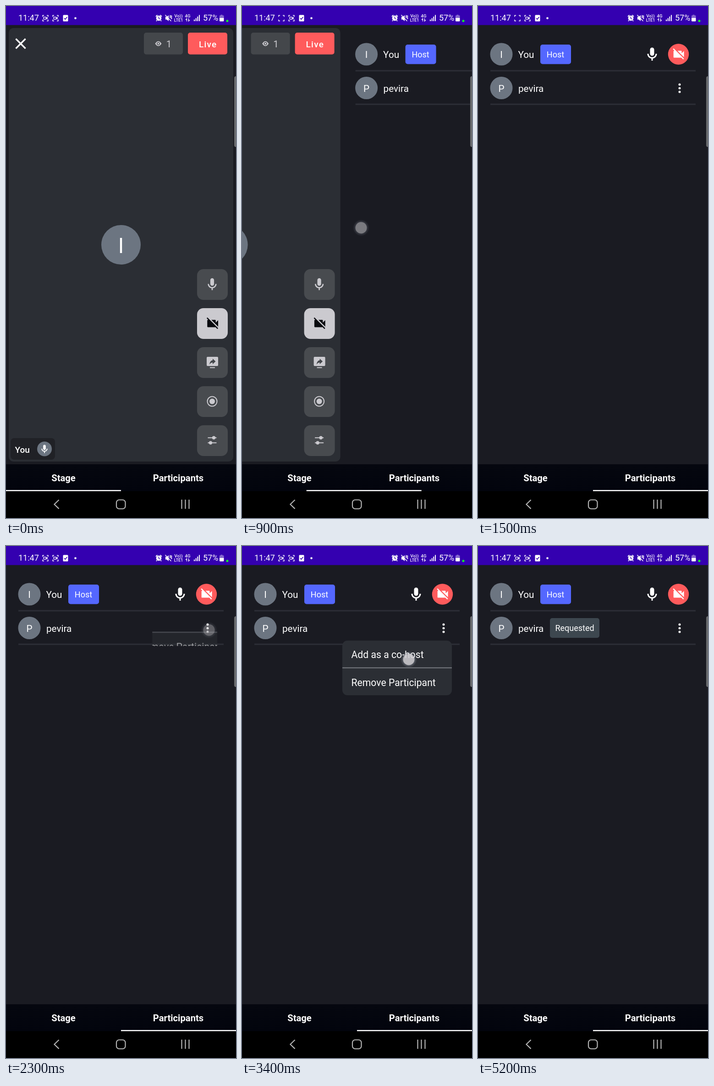
Write an HTML page that moves like this. It is 502 px wide and 1115 px high and loops after 5600 ms.

```html
<!DOCTYPE html>
<html lang="en">
<head>
<meta charset="utf-8">
<title>Live stage</title>
<style>
  html, body { margin: 0; width: 100%; height: 100%; overflow: hidden; background: #1a1b22; }
  svg { display: block; width: 100vw; height: 100vh; font: 20.7px Roboto, sans-serif; fill: #fff; }
  .mid { text-anchor: middle; }
  .bold { font-size: 20.2px; font-weight: 700; }
  .badge { font-size: 18px; }
  .line { fill: none; stroke: #fff; }
  .avatar { fill: #6c7581; }
  .card { fill: #2b2e34; }
  .button { fill: #484b4f; }
  .red { fill: #ff5b5c; }
  .soft { fill: #cbcacf; }
</style>
</head>
<body>
<svg viewBox="0 0 502 1115">
  <defs>
    <path id="mic" d="M0 2c1.66 0 3-1.34 3-3v-6c0-1.66-1.34-3-3-3s-3 1.34-3 3v6c0 1.66 1.34 3 3 3zm5-3c0 2.76-2.24 5-5 5s-5-2.24-5-5h-2c0 3.53 2.61 6.43 6 6.92V9h2V5.92c3.39-.49 6-3.39 6-6.92z"/>
    <path id="camOff" d="M9.5-5.5l-4 4V-5c0-.55-.45-1-1-1h-6.18L9.5 5.18zM-8.23-10L-9.5-8.73-6.77-6H-7.5c-.55 0-1 .45-1 1V5c0 .55.45 1 1 1h12c.21 0 .39-.08.54-.18L8.23 9 9.5 7.73z"/>
    <path id="corners" class="line" stroke-width="1.4" d="M-6-3v-3h3M3-6h3v3M6 3v3h-3M-3 6h-3v-3"/>
    <path id="camera" class="line" stroke-width="1.3" d="M-3.7-2.3h5v4.6h-5zM1.5-.3l2.5-1.6v3.8l-2.5-1.6"/>
    <linearGradient id="tabs" x2="0" y2="1"><stop stop-color="#05070f"/><stop offset="1" stop-color="#02040d"/></linearGradient>
    <radialGradient id="glow"><stop offset=".65" stop-color="#a9b0bd" stop-opacity=".45"/><stop offset="1" stop-color="#a9b0bd" stop-opacity="0"/></radialGradient>
    <clipPath id="reveal"><rect id="revealBox"/></clipPath>
  </defs>

  <rect width="502" height="1115" fill="#1a1b22"/>

  <g id="stagePage">
    <rect class="card" x="6" y="48" width="490" height="944" rx="10"/>
    <path class="line" stroke-width="3.4" d="M21.5 71.5l21 21M42.5 71.5l-21 21"/>
    <rect x="301" y="58" width="85" height="47.500" rx="5" fill="#44474b"/>
    <path class="soft" fill-rule="evenodd" d="M325.500 82q7-10.500 14 0q-7 10.500-14 0zM332.500 78.500a3.500 3.500 0 1 0 .01 0zM332.500 80a2 2 0 1 1-.01 0z"/>
    <text class="mid soft" x="355.500" y="90">1</text>
    <rect class="red" x="397" y="58" width="86" height="47.500" rx="5"/>
    <text x="421" y="90" font-size="19" font-weight="500" letter-spacing="1.200">Live</text>

    <circle class="avatar" cx="251" cy="520" r="43"/>
    <text class="mid" x="251" y="538" font-size="46">I</text>

    <g class="button">
      <rect x="417" y="573" width="67" height="67" rx="14"/>
      <rect class="soft" x="417" y="658" width="67" height="67" rx="14"/>
      <rect x="417" y="743" width="67" height="67" rx="14"/>
      <rect x="417" y="828" width="67" height="67" rx="14"/>
      <rect x="417" y="913" width="67" height="67" rx="14"/>
    </g>
    <g class="soft">
      <use href="#mic" transform="translate(450 606.500) scale(1.370)"/>
      <use href="#camOff" transform="translate(450.500 691.500) scale(1.320)" fill="#08090e"/>
      <path d="M440 764h21q2 0 2 2v16q0 2-2 2h-21q-2 0-2-2v-16q0-2 2-2zM445 786.500h11v2h-11z"/>
      <path fill="#44474b" d="M444 781q1-9 7-9.500v-3.500l6.500 6-6.500 6v-3.500q-4.500 0-7 4.500z"/>
      <circle cx="450" cy="861" r="10.500" fill="none" stroke="#cbcacf" stroke-width="2"/>
      <circle cx="450" cy="861" r="6"/>
      <path d="M440.500 939.200h19v2h-19zM440.500 950.200h19v2h-19z"/>
      <circle cx="453.500" cy="940.200" r="3.700"/><circle cx="446.500" cy="951.200" r="3.700"/>
    </g>

    <rect x="10" y="941" width="97" height="47" rx="8" fill="#202126"/>
    <text x="19.500" y="972.500" font-size="19" font-weight="500">You</text>
    <circle class="avatar" cx="84" cy="964.500" r="16"/>
    <use href="#mic" transform="translate(84 965) scale(.95)"/>
  </g>

  <g id="peoplePage">
    <path fill="#2c2e36" d="M27 139.500h448v3H27zM27 212.500h448v3H27z"/>
    <circle class="avatar" cx="51" cy="105" r="24.500"/>
    <text class="mid" x="51" y="113">I</text>
    <text x="87.500" y="113">You</text>
    <rect x="136" y="84" width="67" height="42.500" rx="5" fill="#5467ff"/>
    <text class="mid badge" x="169" y="111.500">Host</text>
    <use href="#mic" transform="translate(380 105.500) scale(1.500)"/>
    <circle class="red" cx="437.500" cy="105" r="22.700"/>
    <use href="#camOff" transform="translate(437.500 105) scale(1.270)"/>

    <circle class="avatar" cx="51" cy="178.500" r="24.500"/>
    <text class="mid" x="51" y="186.500">P</text>
    <text x="88" y="186.500">pevira</text>
    <g id="requested">
      <rect x="157" y="157" width="108" height="43" rx="5" fill="#3d474f"/>
      <text class="mid badge" x="211" y="185">Requested</text>
    </g>
    <circle cx="440" cy="171" r="2.500"/><circle cx="440" cy="179" r="2.500"/><circle cx="440" cy="187" r="2.500"/>
  </g>

  <g id="menu"><g clip-path="url(#reveal)" font-size="21.200">
    <rect class="card" x="219" y="206" width="239" height="119" rx="11"/>
    <rect x="219" y="264" width="239" height="2.500" fill="#6a6d73"/>
    <text x="238.500" y="243.500">Add as a co-host</text>
    <text x="238.500" y="304.500">Remove Participant</text>
  </g></g>

  <g id="touch">
    <circle r="18" fill="url(#glow)"/>
    <circle r="12.500" fill="#d3d2d6"/>
  </g>

  <rect x="498" y="153" width="10" height="154" rx="4" fill="#696b6e"/>

  <rect y="998" width="502" height="59" fill="url(#tabs)"/>
  <text class="mid bold" x="125.500" y="1035">Stage</text>
  <text class="mid bold" x="376" y="1035">Participants</text>
  <rect y="1056.500" width="502" height="59" fill="#000"/>
  <rect id="underline" y="1054" width="251" height="2.500"/>
  <g class="line" style="stroke:#b4b4b4" stroke-width="2.200">
    <path d="M115.500 1075.500l-10 9.700 10 9.700M383.500 1075v20M391.500 1075v20M399.500 1075v20"/>
    <rect x="241" y="1075.500" width="19.500" height="19.500" rx="6"/>
  </g>

  <rect width="502" height="41.500" fill="#3400b0"/>
  <text x="27" y="32.300" font-size="18">11:47</text>
  <use href="#corners" x="86" y="26.500"/><use id="blink" href="#camera" x="86" y="26.500"/>
  <use href="#corners" x="108" y="26.500"/><use href="#camera" x="108" y="26.500"/>
  <rect x="124.500" y="19.500" width="11" height="14" rx="1.500"/>
  <path class="line" style="stroke:#3400b0" stroke-width="1.600" d="M127 26.500l2.300 2.500 4-5"/>
  <circle cx="151.500" cy="26.500" r="2.300"/>

  <circle cx="333.500" cy="26.500" r="5.800"/>
  <path class="line" stroke-width="1.800" d="M327 23l3.500-3.300M340 23l-3.500-3.300M329.500 31l-1.500 2M337.500 31l1.500 2"/>
  <path class="line" style="stroke:#3400b0" stroke-width="1.300" d="M333.500 23v4l2.800 1.500"/>
  <path d="M348 23.500h3l4-3.500v13l-4-3.500h-3z"/>
  <path class="line" stroke-width="1.500" d="M347.500 19.500l13 13.500M357.500 20l1.500 2-1.500 2 1.500 2M360.500 20.500l1.300 2-1.300 2 1.300 2-1.300 2"/>
  <g class="mid" font-size="9.500" font-weight="500">
    <text x="376.500" y="25">Vo))</text><text x="376.500" y="33.500" font-size="9">LTE1</text>
    <text x="396.500" y="25">4G</text>
  </g>
  <path class="line" stroke-width="1.300" d="M394.500 33.500v-6l-2.500 2.500M398.500 27v6l2.500-2.500"/>
  <path d="M410 29.500h2v3.500h-2zM413.700 26.500h2v6.500h-2zM417.300 23h2v10h-2zM421 19.500h2v13.500h-2z"/>
  <text x="430" y="32.300" font-size="18">57%</text>
  <path d="M468.500 19h4v1.500h2q1 0 1 1v4.500h-9.500v-4.500q0-1 1-1h1.500z" opacity=".4"/>
  <path d="M466 26h9.500v6q0 1.500-1.500 1.500h-6.500q-1.500 0-1.500-1.500z"/>
  <circle cx="483" cy="32.500" r="2.500" fill="#12f02c"/>
</svg>
<script>
const $ = id => document.getElementById(id);
const set = (id, attrs) => { for (const k in attrs) $(id).setAttribute(k, attrs[k]); };
const move = (id, x, y = 0) => set(id, { transform: `translate(${x} ${y})` });
const show = (id, on) => set(id, { opacity: +on });
const progress = (t, from, to) => Math.min(1, Math.max(0, (t - from) / (to - from)));

const touches = [
  { from: 800, to: 960, x: 390, y: 483, speed: -1.3 },
  { from: 2000, to: 2400, x: 443, y: 183, speed: 0 },
  { from: 3400, to: 3700, x: 364, y: 247, speed: 0 },
];

function swipe(t) {
  const offset = 502 * (1 - (1 - progress(t, 750, 1195)) ** 2);
  move('stagePage', -offset);
  move('peoplePage', 502 - offset);
  set('underline', { x: offset / 2 });
}

// The menu slides out of the three-dot button while its clip opens from the middle.
function popup(t) {
  const p = progress(t, 2200, 2500), q = 1 - (1 - p) ** 1.7;
  const half = 119.5 * q ** .75, top = 59.5 * (1 - p ** 3), bottom = 59.5 + 59.5 * q;
  move('menu', 103 * (1 - q), -87 * (1 - p * p));
  set('revealBox', { x: 338.5 - half, y: 206 + top, width: 2 * half, height: bottom - top });
  show('menu', Math.min(1, p * 1.6) * (1 - progress(t, 3600, 3820)));
}

function pointer(t) {
  const touch = touches.find(s => t >= s.from && t < s.to);
  show('touch', 0);
  if (!touch) return;
  const { from, to, x, y, speed } = touch;
  move('touch', x + speed * (t - from), y);
  show('touch', .85 * (1 - progress(t, from, to) ** 2));
}

function draw(now) {
  const t = Math.floor(now % 5600 / 100) * 100; // ten pictures a second
  swipe(t);
  popup(t);
  pointer(t);
  show('requested', t >= 3700);
  show('blink', t % 1000 < 500 || t >= 5000);
  requestAnimationFrame(draw);
}
draw(0);
</script>
</body>
</html>
```
